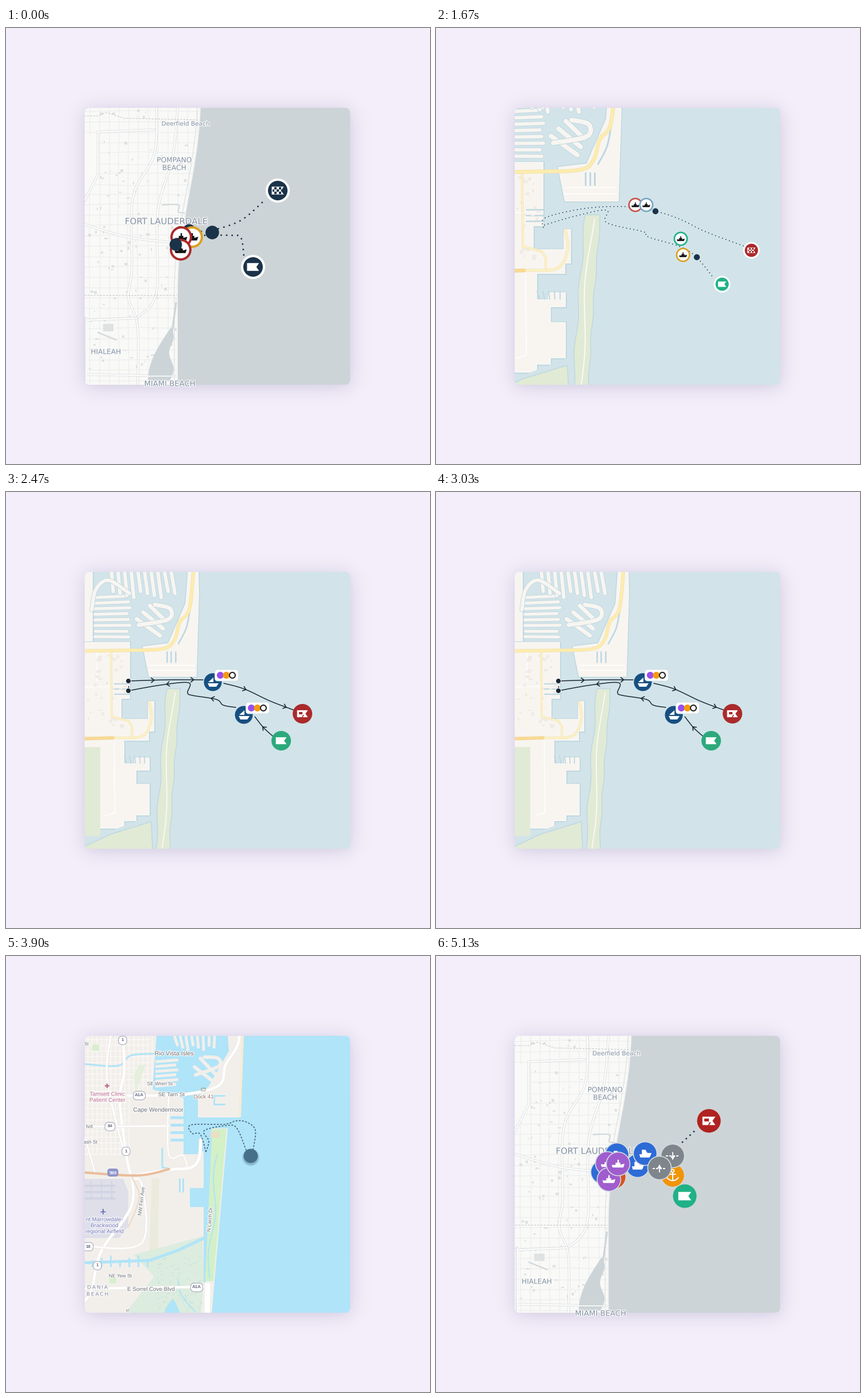
A matplotlib script for the animation above (5160 ms loop, 738 px wide and 759 px high).

```python
import random
import numpy as np
import matplotlib.pyplot as plt
from matplotlib.animation import FuncAnimation
from matplotlib.patches import Circle, FancyBboxPatch, Polygon
from matplotlib.patheffects import withStroke

W, H, DPI = 738, 759, 64
PT = 72 / DPI
LEFT, TOP, RIGHT, BOTTOM = 137, 139, 599, 621
NAVY, RED, GREEN, GOLD = "#1a3349", "#ab2a2b", "#20b187", "#dba021"

fig = plt.figure(figsize=(W / DPI, H / DPI), dpi=DPI)
ax = fig.add_axes([0, 0, 1, 1])


def backdrop():
    """Lavender page with a blurred shadow around the card."""
    def edge(v, lo, hi, k=10):
        return 1 / (1 + np.exp((lo - v) / k)) / (1 + np.exp((v - hi) / k))
    shade = np.outer(edge(np.arange(H), TOP + 3, BOTTOM + 3), edge(np.arange(W), LEFT, RIGHT))
    page, dark = np.array([245, 239, 251]), np.array([204, 199, 221])
    return (page + shade[..., None] * (dark - page)).astype(np.uint8)


def smooth(points, n=8):
    """Catmull-Rom curve through the points."""
    p = np.array([points[0], *points, points[-1]], float)
    t = np.linspace(0, 1, n, endpoint=False)[:, None]
    parts = []
    for a, b, c, d in zip(p, p[1:], p[2:], p[3:]):
        parts.append(b + .5 * t * (c - a + t * (2*a - 5*b + 4*c - d + t * (3*(b - c) + d - a))))
    return np.vstack(parts + [p[-1:]])


def band(top, bottom, left, right):
    """Area between two edges given as functions of y."""
    y = np.linspace(top, bottom, 50)
    return np.vstack([np.c_[left(y), y], np.c_[right(y), y][::-1]])


def rect(x0, y0, x1, y1):
    return [(x0, y0), (x1, y0), (x1, y1), (x0, y1)]


CARD_RECT = rect(LEFT, TOP, RIGHT, BOTTOM)


class Pen:
    """Draws on the card in call order, with map points scaled and shifted."""

    def __init__(self, card, scale=1, shift=(0, 0)):
        self.card, self.scale, self.shift = card, scale, np.array(shift)

    def at(self, points):
        return np.asarray(points, float) * self.scale + self.shift

    def add(self, art):
        art.set_zorder(2)
        art.set_clip_path(self.card)

    def poly(self, points, color, edge="none", lw=0):
        self.add(ax.add_patch(Polygon(self.at(points), fc=color, ec=edge, lw=lw * PT, joinstyle="round")))

    def line(self, points, color, lw, dash=None, cap="round"):
        art, = ax.plot(*self.at(points).T, color=color, lw=lw * self.scale * PT, solid_capstyle=cap,
                       solid_joinstyle="round", dash_capstyle=cap)
        if dash:
            art.set_linestyle((0, dash))
        self.add(art)

    def road(self, points, fill, casing, lw):
        self.line(points, casing, lw + 1.4)
        self.line(points, fill, lw)

    def disc(self, x, y, r, color, edge="none", lw=0):
        self.add(ax.add_patch(Circle(self.at((x, y)), r, fc=color, ec=edge, lw=lw * PT)))

    def pill(self, x, y, w, h, color, radius, edge="none", lw=0):
        style = f"round,pad=0,rounding_size={radius}"
        self.add(ax.add_patch(FancyBboxPatch((x - w / 2, y - h / 2), w, h, boxstyle=style,
                                             fc=color, ec=edge, lw=lw * PT)))

    def icon(self, shape, x, y, s, color):
        self.poly(np.array(shape) * s + (x, y), color)

    def dots(self, points, size, gap):
        self.line(smooth(points), NAVY, size, (0.01, gap / size))

    def text(self, x, y, s, size, color, font="Liberation Sans", halo=2.5, **kw):
        art = ax.text(*self.at((x, y)), s, fontsize=size * PT, color=color, family=font,
                      ha="center", va="center", linespacing=1.05, **kw)
        if halo:
            art.set_path_effects([withStroke(linewidth=halo * PT, foreground="#fbfbfb")])
        self.add(art)


SHIP = [(-1, .15), (-.4, .15), (-.4, -.2), (-.1, -.2), (-.1, -.65), (.12, -.65), (.12, -.2),
        (.35, -.2), (.35, .12), (1, -.05), (.8, .55), (-.85, .55)]
BOAT = [(-.9, .1), (-.5, .1), (-.5, -.6), (.05, -.6), (.35, -.1), (1, -.1), (.7, .6), (-.75, .6)]
FLAG = [(-1, -.65), (1, -.65), (.55, 0), (1, .65), (-1, .65)]


def ring(pen, x, y, r, color):
    pen.disc(x, y, r * .89, "white", color, r * .21)
    pen.icon(SHIP, x, y, r * .56, "#151515")


def badge(pen, x, y, r, color, shape=None, rim="white", lw=0):
    pen.disc(x, y, r, color, rim if lw else "none", lw)
    if shape:
        pen.icon(shape, x, y, r * .55, "white")


def checkered(pen, x, y, r, color, lw):
    badge(pen, x, y, r, color, FLAG, lw=lw)
    c = r * .2
    for k in range(1, 15, 2):
        left, top = x - r * .5 + k % 5 * c, y - 1.5 * c + k // 5 * c
        pen.poly(rect(left, top, left + c, top + c), color)


def two_part_flag(pen, x, y, r, color):
    badge(pen, x, y, r, color, FLAG)
    pen.icon(rect(-.38, -.2, .02, .03), x, y, r, color)
    pen.icon([(.17, .11), (.03, .37), (-.08, .37), (.06, .11)], x, y, r, color)


def grey_map(card, shift=(0, 0)):
    pen = Pen(card, shift=shift)
    rng = random.Random(7)
    sea, minor = "#cdd4d7", "#eaecec"

    def coast(y):
        return 298 + 20 * (1 + np.cos(np.pi * np.clip((y - 120) / 340, 0, 1)))

    Pen(card).poly(CARD_RECT, "#f9f9f7")
    for k in range(28):
        x, y = 146 + 17 * k, 128 + 18 * k
        if x < 340:
            pen.line([(x, 130), (x + rng.uniform(-3, 3), 380), (x, 630)], minor, 1)
        pen.line([(130, y), (230, y + rng.uniform(-3, 3)), (350, y)], minor, 1)
    pen.poly([(130, 186), (157, 186), (157, 270), (130, 298)], "#f9f9f7")
    for _ in range(130):
        x, y = rng.uniform(140, 320), rng.uniform(140, 615)
        if x > 160 or y > 300:
            pen.poly(rect(x, y, x + rng.uniform(1.5, 6), y + rng.uniform(1.5, 5)), "#dfe2e3")
    pen.poly(rect(169, 515, 187, 528), "#dfe2e2")
    pen.line([(160, 530), (192, 543)], "#d6dadb", 2.5)
    west = [(258, 177), (160, 181), (160, 255), (135, 304)]
    interstate = [(262, 135), (258, 220), (221, 295), (219, 420), (213, 470), (229, 520), (229, 630)]
    shore_road = [(299, 135), (290, 225), (264, 320), (262, 460), (228, 505)]
    cross = [(130, 340), (212, 364), (300, 374)]
    for pts in (west, smooth(interstate), smooth(shore_road), smooth(cross),
                [(130, 509), (228, 505)], [(130, 603), (300, 606)], [(139, 505), (139, 630)]):
        pen.road(pts, "#fdfdfd", "#d5d9db", 2.6)
    for pts in ([(130, 153), (160, 153), (175, 147), (205, 157), (335, 160)], [(130, 465), (300, 465)]):
        pen.line(pts, "#c5cacd", 1.1, (3, 2), "butt")
    pen.line(smooth([(272, 308), (300, 308), (300, 320), (313, 322)]), "#d0d6d9", 2)
    y = np.linspace(130, 640, 60)
    pen.poly(band(130, 640, coast, lambda y: 0 * y + 640), sea)
    pen.line(np.c_[coast(y), y], "#f4f5f4", 2)
    pen.line(np.c_[coast(y) - 5, y], "#dde1e2", 1.2)
    pen.poly(band(520, 614, lambda y: 288 - 41 * np.sin(np.pi / 2 * (y - 520) / 94),
                  lambda y: 288 - 4 * np.cos(y / 9)), sea)
    pen.line([(296, 478), (289, 530)], sea, 3)
    pen.line([(246, 606), (298, 606)], "#f4f5f4", 2)
    ink, font = "#8392a2", "DejaVu Sans"
    pen.text(313, 167, "Deerfield Beach", 10.5, ink, font)
    pen.text(293, 237, "POMPANO\nBEACH", 12.2, ink, font)
    pen.text(279, 337, "FORT LAUDERDALE", 15, ink, font)
    pen.text(174, 564, "HIALEAH", 12.1, ink, font)
    pen.text(285, 620, "MIAMI BEACH", 13.2, ink, font)


def navy_route(card):
    grey_map(card)
    pen = Pen(card)
    pen.dots([(340, 354), (371, 349), (412, 333), (453, 297)], 3, 10)
    pen.dots([(346, 361), (394, 361), (409, 365), (414, 396)], 3, 9.5)
    pen.disc(303, 354, 9, NAVY)
    pen.disc(319, 352, 10.5, NAVY)
    ring(pen, 324, 364, 19, GOLD)
    ring(pen, 305, 364, 19, RED)
    ring(pen, 304, 386, 19, RED)
    pen.disc(295.5, 377, 10.8, NAVY)
    pen.disc(359, 356, 11.8, NAVY)
    checkered(pen, 473, 283, 19, NAVY, 4)
    badge(pen, 430, 416, 19, NAVY, FLAG, lw=4)


def anchor(pen, x, y):
    angle = np.linspace(.15, .85, 12) * np.pi
    pen.disc(x, y - 8, 2.5, "none", "white", 1.8)
    pen.line([(x, y - 5), (x, y + 9)], "white", 2)
    pen.line([(x - 5, y - 2), (x + 5, y - 2)], "white", 2)
    pen.line(np.c_[x + 11 * np.cos(angle), y - 1 + 10 * np.sin(angle)], "white", 2)


def gap_sign(pen, x, y, way):
    pen.line([(x - 12, y), (x + 12, y)], "white", 2, (2, 1), "butt")
    pen.line([(x, y - 6), (x, y + 6)], "white", 1.8)
    pen.icon([(-4, way), (4, way), (0, 6 * way)], x, y, 1, "white")


def coloured_route(card):
    grey_map(card, (1.5, 3))
    pen = Pen(card)
    blue, purple, grey = "#2d6bd6", "#9f5dcd", "#7f868b"

    def stop(x, y, color, shape=None):
        badge(pen, x, y, 20.5, color, shape, "#d5dbe2", 1.6)

    pen.dots([(429, 324), (453, 302)], 3, 9)
    stop(315, 346, blue, BOAT)
    stop(290, 376, blue)
    stop(412, 382, "#f19405")
    anchor(pen, 412, 382)
    stop(412, 348, grey)
    gap_sign(pen, 412, 348, 1)
    stop(310, 385, "#d5541f")
    stop(351, 365, blue, BOAT)
    stop(364, 344, blue, BOAT)
    stop(389, 369, grey)
    gap_sign(pen, 389, 370, -1)
    stop(298, 361, purple, SHIP)
    stop(301, 389, purple, SHIP)
    stop(317, 362, purple, SHIP)
    two_part_flag(pen, 475, 287, 20.5, "#b02220")
    badge(pen, 433, 418, 20.5, GREEN, FLAG)


def harbour_map(card, scale=1, shift=(0, 0)):
    pen = Pen(card, scale, shift)
    sea, land, shore, green = "#d2e4e9", "#f8f5f1", "#bfd8e1", "#e1ead5"
    Pen(card).poly(CARD_RECT, sea)

    def ground(*areas, color=land):
        for area in areas:
            pen.poly(area, color, shore, 3)
        for area in areas:
            pen.poly(area, color)

    def finger(points, lw=6):
        pen.line(points, shore, lw + 2)
        pen.line(points, land, lw)

    ground(rect(90, 90, 114, 240))
    for k in range(8):
        finger([(118, 146 + 11 * k), (181 + k % 3 * 3, 143 + 11.5 * k)])
    for k in range(10):
        finger([(150 + 13 * k, 90), (154 + 13.5 * k, 134 + k % 4 * 4)], 7)
    finger(smooth([(112, 170), (120, 130), (145, 112), (186, 138)]), 7)
    for k in range(3):
        finger([(200 + 13 * k, 188 - 13 * k), (246 + 6 * k, 221 - 14 * k)], 8)
    finger(smooth([(236, 160), (266, 168), (262, 189), (204, 200)]), 8)

    ground(rect(90, 233, 187, 345), rect(90, 340, 170, 390), rect(90, 385, 225, 428),
           rect(222, 350, 235, 410), rect(90, 425, 176, 600), rect(170, 472, 200, 586),
           rect(195, 460, 226, 486), rect(195, 512, 226, 575))
    pen.poly([(90, 628), (236, 572), (236, 600), (90, 640)], sea)
    ground([(301, 90), (322, 90), (323, 139), (318, 302), (224, 302), (212, 242), (262, 236), (296, 158)])
    ground([(90, 640), (150, 612), (228, 588), (231, 650)], color=green)
    pen.poly(rect(95, 440, 128, 615), green)

    def middle(y):
        return 251 + 22 * ((650 - y) / 325) ** 1.3

    ground(band(326, 650, lambda y: middle(y) - 12 - 2 * np.sin(y / 17),
                lambda y: middle(y) + 13 + np.sin(y / 11)), color=green)
    y = np.linspace(333, 640, 40)
    pen.line(np.c_[middle(y) + 4 * np.sin(y / 40), y], "#fbfaf5", 2)

    for k in range(3):
        pen.line([(157, 316 + 10 * k), (187, 316 + 10 * k)], shore, 2.5)
        pen.line([(260 + 8 * k, 252), (260 + 8 * k, 273)], shore, 3)
    for k in range(5):
        pen.line([(176 + 10 * k, 458), (180 + 9 * k, 472)], shore, 2)
    pen.line(smooth([(282, 237), (298, 205), (306, 163)]), shore, 3)
    for pts in ([(90, 322), (153, 321)], [(122, 250), (122, 310)], [(156, 430), (157, 570), (138, 575)],
                [(224, 278), (314, 278)], [(224, 289), (314, 289)]):
        pen.line(pts, "#ffffff", 1.6)
    rng = random.Random(3)
    for _ in range(40):
        x, y = rng.uniform(100, 178), rng.uniform(256, 400)
        pen.poly(rect(x, y, x + rng.uniform(2, 9), y + rng.uniform(2, 7)), "#f0ebe4")

    yellow, rim = "#fbf0c4", "#f3e5bf"
    pen.road([(150, 252), (151, 380), (184, 389), (191, 400), (191, 422)], yellow, rim, 3)
    pen.road(smooth([(90, 423), (160, 422), (212, 418), (229, 385), (225, 352)]), yellow, rim, 4)
    pen.road([(90, 424), (153, 422)], "#f9da93", "#f1cf8c", 5)
    pen.road(smooth([(90, 251), (170, 250), (250, 247), (274, 230), (285, 194), (304, 168), (312, 90)]),
             "#fcecae", "#f2e0b0", 5.5)


def ship_route(card):
    harbour_map(card)
    pen = Pen(card)
    pen.dots([(187, 347), (191, 330), (260, 314), (330, 311), (382, 319), (425, 333), (470, 355),
              (537, 380)], 1.8, 6.4)
    pen.dots([(189, 343), (240, 328), (297, 317), (297, 339), (362, 355), (370, 364), (440, 388),
              (484, 436)], 1.8, 6.4)
    ring(pen, 347, 308, 12.5, "#c8514a")
    ring(pen, 366, 308, 12.5, "#78a6c5")
    ring(pen, 426, 367, 12.5, GREEN)
    ring(pen, 430, 395, 12.5, GOLD)
    pen.disc(382, 319, 5.2, NAVY)
    pen.disc(454, 399, 5.2, NAVY)
    checkered(pen, 549, 387, 13, RED, 3)
    badge(pen, 498, 446, 13, GREEN, FLAG, lw=3)


def arrow_line(pen, points, *stops, ink="#1b2733"):
    """Curve with open arrow heads at the given parts of its length."""
    path = smooth(points)
    pen.line(path, ink, 1.5)
    length = np.r_[0, np.cumsum(np.hypot(*np.diff(path, axis=0).T))]
    for stop in stops:
        base, tip = [np.array([np.interp(stop * length[-1] + d, length, axis) for axis in path.T])
                     for d in (-4, 2)]
        along = (tip - base) / np.hypot(*(tip - base))
        side = np.array([-along[1], along[0]])
        pen.line([tip - 5 * along + 4 * side, tip, tip - 5 * along - 4 * side], ink, 1.6)


def sail_stop(pen, x, y):
    badge(pen, x, y, 16, "#164f82", rim="#dfe9ee", lw=.8)
    pen.icon([(-9, 2), (10, 2), (6, 8), (-6, 8)], x, y, 1, "white")
    pen.icon([(1, -8), (1, 0), (-8, 0)], x, y, 1, "white")
    cx, cy = x + 24, y - 12
    pen.pill(cx, cy, 42, 21, "#c3d5dc", 5.5)
    pen.pill(cx, cy, 40.5, 19.5, "white", 5)
    pen.disc(cx - 11, cy, 6, "#994ff0")
    pen.disc(cx - .5, cy, 6, "#f59a12")
    pen.disc(cx + 10, cy, 5, "white", "#202020", 2)


def arrow_route(card):
    harbour_map(card, .885, (50.3, 54.5))
    pen = Pen(card)
    pen.line([(213, 329), (213, 346)], "#1b2733", 1.4, (3, 3), "butt")
    arrow_line(pen, [(213, 329), (280, 327), (343, 327)], .33, .86)
    arrow_line(pen, [(400, 375), (378, 371), (366, 361), (324, 354), (316, 349), (318, 332), (270, 336),
                     (213, 346)], .21, .68)
    arrow_line(pen, [(379, 333), (415, 343), (460, 364), (502, 380)], .29, .87)
    arrow_line(pen, [(468, 428), (449, 411), (433, 391)], .52)
    for y in (329, 346):
        pen.disc(213, y, 4.6, "#1b2733", "white", 1)
    sail_stop(pen, 360, 331)
    sail_stop(pen, 414, 388)
    two_part_flag(pen, 516, 386, 17, RED)
    badge(pen, 479, 433, 17, "#2ca97c", FLAG)


def street_map(card):
    pen = Pen(card)
    land, sea, green = "#f2efeb", "#b0e4f8", "#d3f0c6"
    rng = random.Random(5)
    pen.poly(CARD_RECT, land)
    for k in range(21):
        x, y = 142 + 8 * k, 145 + 10 * k
        if x < 255:
            pen.line([(x, 139), (x, 235 if x > 215 else 345)], "#fbfaf8", 1.3)
        pen.line([(137, y), (250 if y < 235 else 210, y)], "#fbfaf8", 1.3)
    pen.poly(rect(150, 154, 162, 165), "#d9eecf")
    pen.poly(rect(180, 560, 192, 570), "#d9eecf")
    pen.poly([(222, 208), (232, 190), (243, 189), (226, 238)], "#e4f0dc")
    pen.poly([(137, 388), (204, 388), (213, 410), (213, 470), (197, 491), (137, 491)], "#dfdfea")
    for k in range(3):
        pen.line([(137, 400 + 11 * k), (189, 400 + 11 * k)], "#d3d4e3", 4)
        pen.line([(148 + 18 * k, 392), (148 + 18 * k, 425)], "#d3d4e3", 2)
    pen.poly([(254, 387), (267, 387), (264, 510), (249, 516)], "#eaebdc")

    # marsh and canals
    pen.poly([(222, 520), (342, 488), (345, 560), (339, 621), (208, 621), (258, 558)], "#dcecdf")
    for _ in range(110):
        x, y = rng.uniform(262, 338), rng.uniform(522, 617)
        pen.line([(x, y), (x + 3, y)], "#c3e2dc", 1)
    pen.poly(smooth([(275, 621), (290, 598), (303, 621)]), sea)
    pen.line(smooth([(330, 620), (305, 590), (300, 565)]), sea, 2)
    pen.line([(137, 534), (250, 530), (300, 512), (345, 491)], sea, 5)
    for k in range(7):
        pen.line([(150 + 16 * k, 529 - k % 3 * 4), (150 + 16 * k, 541)], sea, 3, cap="butt")
    pen.line(smooth([(137, 188), (195, 191), (218, 173), (270, 170)]), sea, 3)

    # islands and harbour
    pen.poly([(262, 139), (386, 139), (388, 165), (352, 228), (332, 247), (308, 247), (255, 232)], sea)
    for k in range(6):
        pen.line([(260, 184 + 8.5 * k), (300 - k % 2 * 4, 181 + 8.5 * k)], land, 5, cap="butt")
    for k in range(8):
        pen.line([(293 + 10 * k, 139), (299 + 9 * k, 157 + k % 3 * 4)], land, 5, cap="butt")
    for k in range(2):
        pen.line([(328 + 10 * k, 193 - 15 * k), (359 + 5 * k, 217 - 12 * k)], land, 6)
    pen.line(smooth([(345, 176), (369, 178), (370, 192), (330, 207)]), land, 6)

    def coast(y):
        return 386 - .087 * (y - 300)

    def park_edge(y):
        return 359 - .045 * (y - 300)

    east = lambda y: 0 * y + RIGHT
    pen.poly(band(139, 300, lambda y: 413 - .035 * (y - 139), east), sea)
    pen.poly(band(295, 621, coast, east), sea)
    pen.poly(rect(309, 240, 334, 345), sea)
    pen.poly(rect(309, 281, 409, 300), sea)
    pen.poly(rect(309, 290, 358, 340), sea)
    pen.poly(band(335, 575, lambda y: 344 + 0 * y, park_edge), sea)
    pen.poly(rect(320, 404, 346, 437), sea)
    for k in range(4):
        pen.line([(286, 281 + 13 * k), (312, 281 + 13 * k)], sea, 5, cap="butt")
    for x in (302, 308):
        pen.line([(x, 388), (x, 410)], sea, 3)
    pen.line([(380, 258), (362, 258), (362, 243), (380, 243)], sea, 3)
    pen.line([(272, 335), (272, 368), (283, 370)], sea, 3)
    pen.line([(412, 139), (407, 279)], "#f6ecd6", 4)
    pen.poly(band(301, 566, park_edge, lambda y: coast(y) - 2), green)
    pen.poly(rect(356, 306, 372, 316), "#e9dfc5")
    y = np.linspace(345, 560, 40)
    pen.line(np.c_[(park_edge(y) + coast(y)) / 2 - 2 + 4 * np.sin(y / 22), y], sea, 2)
    pen.poly(band(568, 621, lambda y: 0 * y + 343, coast), land)
    pen.line([(351, 573), (350, 625)], "#ffffff", 9)

    def street(lw, *pts):
        pen.road(smooth(pts), "#ffffff", "#ebe8e5", lw)

    street(4.5, (203, 135), (206, 200), (198, 250), (209, 345), (220, 430), (165, 515), (150, 580), (137, 600))
    street(3, (183, 135), (176, 215), (205, 340))
    street(3, (137, 297), (284, 296))
    street(2.5, (137, 314), (155, 377))
    street(4.5, (212, 243), (310, 241), (371, 225), (382, 190), (402, 158), (407, 135))
    street(2.5, (283, 245), (283, 345), (308, 347), (316, 370))
    street(5, (228, 381), (284, 372), (322, 368), (336, 352), (339, 320))
    street(3, (218, 388), (237, 400), (236, 500), (137, 505))
    street(4, (137, 579), (345, 576))
    pen.line(smooth([(219, 385), (232, 420), (213, 472)]), "#f1d7c0", 2)
    pen.line(smooth([(137, 377), (230, 382), (284, 371)]), "#e9bd9a", 4)


def street_labels(card):
    pen = Pen(card)
    ink, pink, violet = "#6c7178", "#bd6a8c", "#6f74b8"

    def shield(x, y, s):
        pen.pill(x, y, 11 + 3.4 * len(s), 15, "white", 7, "#9fa3b5", 1)
        pen.text(x, y, s, 8, "#6c7082", halo=0, weight="bold")

    for y, x in ((147, 203), (340, 209), (539, 159)):
        shield(x, y, "1")
    shield(232, 243, "A1A")
    shield(332, 577, "A1A")
    shield(181, 297, "84")
    shield(143, 506, "18")
    pen.pill(186, 377, 19, 14, "#8e94cb", 5)
    pen.text(186, 378, "595", 8, "white", halo=0, weight="bold")
    pen.text(293, 170, "Rio Vista Isles", 10.8, ink)
    pen.text(268, 222.5, "SE Wren St", 8.6, ink)
    pen.text(288, 241, "SE Tarn St", 9.7, ink)
    pen.text(344, 245, "Dock 41", 9.5, "#8f7866")
    pen.text(265, 268, "Cape Wendermoor", 10.4, ink)
    pen.text(176, 245.5, "Tamsett Clinic\nPatient Center", 9.8, pink)
    pen.text(236, 427, "NW Fen Ave", 9, ink, rotation=83)
    pen.text(355, 459, "N Larch Dr", 8.8, ink, rotation=85)
    pen.text(171, 469, "nt Marrowdale-\nBrackwood\nregional Airfield", 9.8, violet)
    pen.text(199, 557, "NE Yew St", 8.5, ink)
    pen.text(252, 580, "E Sorrel Cove Blvd", 9.8, ink)
    pen.text(145, 297, "lvd", 9, ink)
    pen.text(147, 324, "ash St", 8.5, ink)
    pen.text(140, 154, "St", 8, ink)
    pen.text(213, 617, "S", 8, ink, rotation=90)
    for y, s in ((577, "DANIA"), (589, "BEACH")):
        pen.text(159, y, "\u2009".join(s), 9, "#8b8fa3", "DejaVu Sans")
    pen.line([(172, 226), (180, 226)], pink, 2.4, cap="butt")
    pen.line([(176, 222), (176, 230)], pink, 2.4, cap="butt")
    pen.line([(169, 441), (169, 449)], violet, 2)
    pen.line([(165, 446), (169, 444), (173, 446)], violet, 1.6)
    pen.pill(343.5, 232.5, 7, 5, "none", 1, "#a58f7d", 1)


def dashed_route(card):
    street_map(card)
    street_labels(card)
    pen = Pen(card)
    outer = [(348, 341), (338, 310), (324, 309), (322, 294), (380, 293), (400, 287), (418, 289),
             (434, 303), (430, 338)]
    inner = [(348, 341), (353, 322), (345, 304), (385, 295), (402, 300), (418, 338)]
    for pts in (outer, inner):
        pen.line(smooth(pts), "#3e6079", 1.6, (1.9, 1.6), "butt")
    for r in (15, 14, 13):
        pen.disc(426, 350.5, r, (.2, .35, .45, .12))
    pen.disc(426, 348, 12.3, "#466f8a")


def render(scene):
    ax.clear()
    ax.imshow(PAGE, extent=(0, W, H, 0), aspect="auto", interpolation="nearest")
    ax.axis("off")
    card = FancyBboxPatch((LEFT, TOP), RIGHT - LEFT, BOTTOM - TOP, fc="none", ec="none",
                          boxstyle="round,pad=0,rounding_size=9")
    ax.add_patch(card)
    scene(card)
    ax.set(xlim=(0, W), ylim=(H, 0))
    fig.canvas.draw()
    return np.array(fig.canvas.buffer_rgba())


PAGE = backdrop()
STEP, LOOP = 30, 5160
STARTS = [0, 1650, 2460, 3300, 4140]
slides = [render(s) for s in (navy_route, ship_route, arrow_route, dashed_route, coloured_route)]
fig.clear()
view = fig.figimage(slides[0], origin="upper")


def update(frame):
    view.set_data(slides[np.searchsorted(STARTS, frame * STEP, side="right") - 1])
    return view,


anim = FuncAnimation(fig, update, frames=LOOP // STEP, interval=STEP, repeat=True, repeat_delay=0)
plt.show()
```
